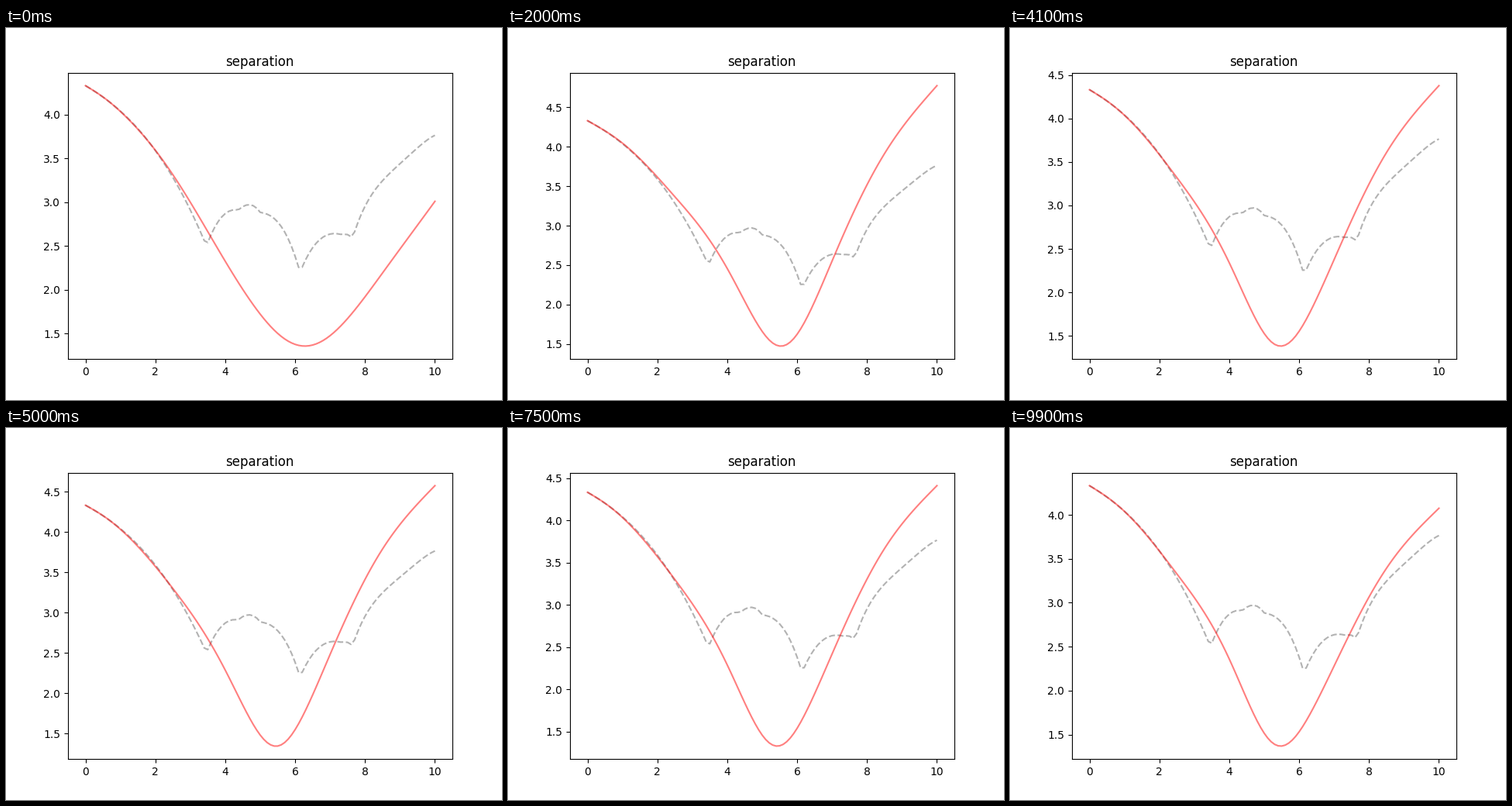
A matplotlib script for the animation above (10 s loop, 640 by 480 pixels).

```python
import numpy as np
import matplotlib.pyplot as plt
from matplotlib.animation import FuncAnimation

FRAMES, INTERVAL = 100, 100
START = 4.332
T = np.linspace(0, 10, 101)


def spline(x, y, at):
    """Natural cubic spline through the points (x, y)."""
    x, y = np.asarray(x, float), np.asarray(y, float)
    n, h = len(x), np.diff(x)
    slope = np.diff(y) / h
    a, b = np.eye(n), np.zeros(n)
    for i in range(1, n - 1):
        a[i, i - 1:i + 2] = h[i - 1], 2 * (h[i - 1] + h[i]), h[i]
        b[i] = 6 * (slope[i] - slope[i - 1])
    m = np.linalg.solve(a, b)
    k = np.clip(np.searchsorted(x, at, side="right") - 1, 0, n - 2)
    d = at - x[k]
    return (y[k] + d * (slope[k] - h[k] * (2 * m[k] + m[k + 1]) / 6)
            + d**2 * m[k] / 2 + d**3 * (m[k + 1] - m[k]) / (6 * h[k]))


def arc(begin, end, *heights):
    """Polynomial through evenly spaced heights, sampled every 0.1."""
    keys = np.linspace(0, 1, len(heights))
    coef = np.polyfit(keys, heights, len(heights) - 1)
    return np.polyval(coef, np.linspace(0, 1, round((end - begin) * 10) + 1))


def measured():
    return np.concatenate([
        arc(0, 3.4, START, 3.991, 3.434, 2.56),
        arc(3.5, 4.3, 2.54, 2.76, 2.88, 2.912),
        arc(4.4, 5.0, 2.92, 2.967, 2.96, 2.885),
        arc(5.1, 6.1, 2.875, 2.802, 2.61, 2.255),
        arc(6.2, 7.2, 2.257, 2.498, 2.617, 2.64),
        arc(7.3, 7.6, 2.633, 2.634, 2.63, 2.605),
        arc(7.7, 10, 2.66, 3.135, 3.385, 3.594, 3.765),
    ])


def fitted(s4, closest, gap, s7, s10):
    """Distance sqrt(gap^2 + d^2), where d runs smoothly through zero."""
    def along(s):
        return np.sqrt(max(s * s - gap * gap, 0))

    lift = s4 - 2.3
    before = [START, 4.203, 4.035 + 0.08 * lift, 3.305 + 0.4 * lift, s4]
    d7, d10 = along(s7), along(s10)
    x = [0, 0.5, 1, 2.5, 4, closest, 7, 8.5, 10]
    d = [-along(s) for s in before] + [0, d7, (d7 + d10) / 2 + 0.15 * d7, d10]
    return np.hypot(gap, spline(x, d, T))


# time in s, then: s(4), moment and size of the closest gap, s(7), s(10)
KEYS = [
    (0.0, 2.325, 6.28, 1.356, 1.475, 3.01),
    (0.5, 2.63, 6.00, 1.62, 1.94, 3.38),
    (0.9, 2.54, 5.65, 1.536, 2.08, 3.565),
    (1.7, 2.46, 5.52, 1.475, 2.50, 4.62),
    (3.1, 2.41, 5.52, 1.42, 2.33, 4.305),
    (5.0, 2.285, 5.45, 1.341, 2.48, 4.575),
    (6.5, 2.265, 5.47, 1.278, 2.335, 4.21),
    (7.5, 2.29, 5.43, 1.33, 2.42, 4.41),
    (8.4, 2.30, 5.42, 1.333, 2.32, 4.168),
    (9.9, 2.36, 5.47, 1.369, 2.28, 4.075),
]
times, *tracks = zip(*KEYS)

fig, ax = plt.subplots(figsize=(6.4, 4.8), dpi=100)
ax.set_title("separation", x=0.498)
ax.plot(T, measured(), "k--", alpha=0.3)
fit, = ax.plot(T, T, "r", alpha=0.5)


def update(i):
    now = i * INTERVAL / 1000
    fit.set_ydata(fitted(*(spline(times, track, now) for track in tracks)))
    ax.relim()
    ax.autoscale_view()
    return fit,


anim = FuncAnimation(fig, update, frames=FRAMES, interval=INTERVAL,
                     repeat=True, repeat_delay=0, blit=False)
plt.show()
```
